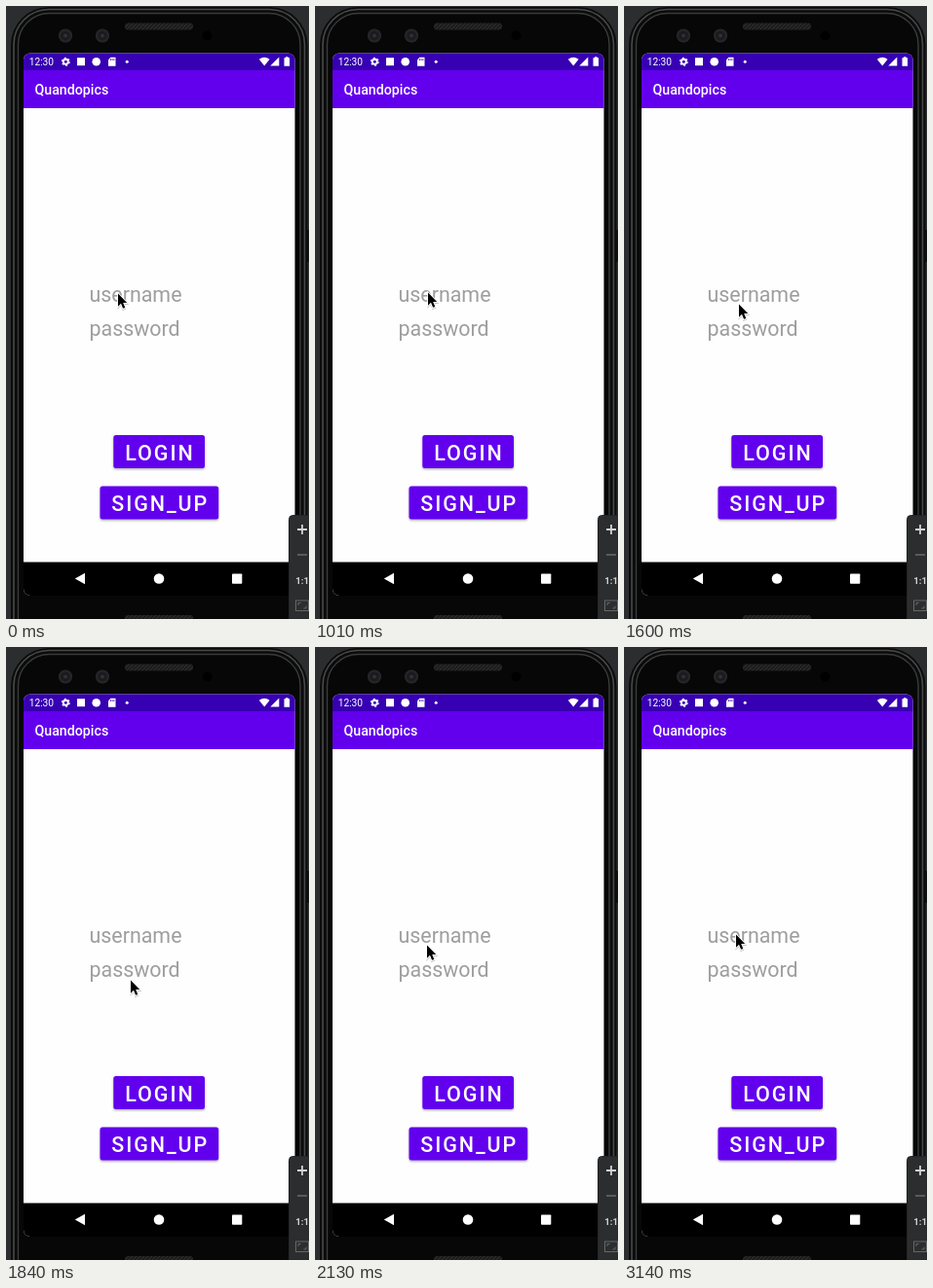
Write an HTML page that moves like this. It is 311 px wide and 630 px high and loops after 8000 ms.

```html
<!DOCTYPE html>
<html lang="en">
<head>
<meta charset="utf-8">
<title>Login screen</title>
<style>
  html, body { margin: 0; width: 100%; height: 100%; overflow: hidden; background: #2c2d2f; }
  svg { display: block; width: 311px; height: 630px; }
  text { font-family: Roboto, "Noto Sans", sans-serif; }
  .hint { font-size: 21.4px; fill: #9e9e9e; }
  .label { font-size: 21.5px; font-weight: 500; letter-spacing: 1.92px; fill: #fff; }
  .white { fill: #fff; }
</style>
</head>
<body>
<svg viewBox="0 0 311 630">
  <defs>
    <radialGradient id="lens">
      <stop offset="0" stop-color="#3a3a40"/>
      <stop offset=".45" stop-color="#17171b"/>
      <stop offset="1" stop-color="#2c2c2e"/>
    </radialGradient>
    <pattern id="mesh" width="4" height="4" patternUnits="userSpaceOnUse">
      <rect width="4" height="4" fill="#1d1d1d"/>
      <path d="M0 4L4 0" stroke="#303030"/>
    </pattern>
    <clipPath id="screen"><rect x="18" y="48.500" width="278.500" height="557.500" rx="7"/></clipPath>
    <filter id="lift" x="-10%" y="-20%" width="120%" height="160%">
      <feDropShadow dx="0" dy="1.2" stdDeviation="1" flood-opacity=".35"/>
    </filter>
    <filter id="soft" x="-50%" y="-50%" width="200%" height="200%">
      <feDropShadow dx="0" dy="1" stdDeviation=".7" flood-opacity=".3"/>
    </filter>
  </defs>

  <!-- phone body -->
  <rect width="311" height="630" fill="#2c2d2f"/>
  <rect x="308" y="230" width="3" height="33" fill="#101010"/>
  <rect x="5" y="1" width="304.500" height="680" rx="39" fill="#0b0b0b"/>
  <rect x="8" y="3.500" width="298.500" height="680" rx="36" fill="none" stroke="#484949" stroke-width="1.600"/>
  <rect x="12.500" y="7.500" width="289.500" height="680" rx="32" fill="#070707" stroke="#3a3b3b" stroke-width="1.400"/>
  <rect x="122" y="17.500" width="70" height="7" rx="3" fill="url(#mesh)"/>
  <rect x="122" y="626" width="70" height="9" rx="3" fill="url(#mesh)"/>
  <circle cx="61" cy="30.500" r="7" fill="url(#lens)"/>
  <circle cx="99" cy="30.500" r="7" fill="url(#lens)"/>
  <circle cx="206.500" cy="30.500" r="5" fill="#000"/>

  <!-- screen -->
  <g clip-path="url(#screen)">
    <rect x="18" y="48" width="279" height="558" fill="#fefefe"/>
    <rect x="18" y="48" width="279" height="18" fill="#3700b3"/>
    <rect x="18" y="66" width="279" height="39" fill="#6200ee"/>
    <rect x="18" y="571.500" width="279" height="35" fill="#000"/>
  </g>

  <!-- status bar -->
  <g class="white">
    <text x="23.700" y="61" font-size="10.200">12:30</text>
    <g transform="translate(61.300 57.200)" fill="none" stroke="#fff">
      <circle r="2.500" stroke-width="1.900"/>
      <circle r="3.800" stroke-width="1.300" stroke-dasharray="1.990"/>
    </g>
    <rect x="73" y="53.200" width="8" height="8"/>
    <circle cx="92.700" cy="57.200" r="4.300"/>
    <path d="M107.400 52.800H112.500V61.700H105V55.200Z"/>
    <path d="M107.500 54.200v1.800M109.200 54.200v1.800M110.900 54.200v1.800" stroke="#3700b3" stroke-width=".8"/>
    <circle cx="124.200" cy="57.200" r="1.500"/>
    <path d="M259.800 54.800Q265.200 50.800 270.600 54.800L265.200 61.600Z"/>
    <path d="M280.300 52.600V61.600H271.300Z"/>
    <path d="M287 52.300h2.600v1h1.500v8.400h-5.600v-8.400h1.500Z"/>
  </g>

  <!-- app -->
  <text class="white" x="29.500" y="91" font-size="14.200" font-weight="500">Quandopics</text>
  <text class="hint" x="85.500" y="304">username</text>
  <text class="hint" x="85.500" y="339">password</text>
  <g fill="#6200ee" filter="url(#lift)">
    <rect x="110.300" y="441" width="93.700" height="34" rx="2.500"/>
    <rect x="96.500" y="493.500" width="121.700" height="34" rx="2.500"/>
  </g>
  <text class="label" x="122.200" y="466.800">LOGIN</text>
  <text class="label" x="108.300" y="519.200">SIGN_UP</text>

  <!-- navigation bar -->
  <g class="white">
    <path d="M70.800 588.500L81 582.800V594.200Z"/>
    <circle cx="157" cy="588.500" r="5.300"/>
    <rect x="232" y="583.500" width="10.300" height="10.300" rx=".8"/>
  </g>

  <!-- zoom panel -->
  <path d="M311 523.500H294.500Q290.500 523.500 290.500 527.500V630H311Z" fill="#2c2d2f" stroke="#232425"/>
  <path d="M299 538h10M304 533v10" stroke="#d2d2d2" stroke-width="1.800"/>
  <path d="M299 564h10" stroke="#727374" stroke-width="1.300"/>
  <text x="297.300" y="593.500" font-size="9.600" font-weight="700" fill="#d2d2d2">1:1</text>
  <g fill="none" stroke="#666769">
    <rect x="297.500" y="611" width="13" height="10.500"/>
    <path d="M300 616v-2.500h2.500M308 616.500v2.500h-2.500"/>
  </g>

  <g id="cursor" filter="url(#soft)">
    <path d="M1 .5V13.700L4 10.800L6.100 15.800L8.300 14.900L6.200 10H10.200Z" fill="#000" stroke="#fff" stroke-width="1.700" paint-order="stroke"/>
  </g>
</svg>
<script>
  const LOOP = 8000;
  // Pointer positions: start time, x, y; each holds until the next.
  const stops = [
    [0, 114, 295], [470, 115, 295], [1010, 115, 294], [1240, 115, 293], [1300, 115, 292],
    [1540, 115, 295], [1600, 117, 306], [1660, 121, 324], [1720, 126, 341], [1780, 128, 347],
    [1840, 127, 342], [1900, 123, 331], [1960, 119, 319], [2020, 115, 310], [2130, 114, 306],
    [2910, 114, 303], [2970, 114, 300], [3030, 114, 297], [3140, 114, 295]
  ];
  const cursor = document.getElementById("cursor");

  function draw(time) {
    const [, x, y] = stops.findLast(([start]) => start <= time);
    cursor.setAttribute("transform", `translate(${x} ${y})`);
  }

  const origin = performance.now();
  function tick() {
    draw((performance.now() - origin) % LOOP);
    requestAnimationFrame(tick);
  }
  tick();
</script>
</body>
</html>
```
